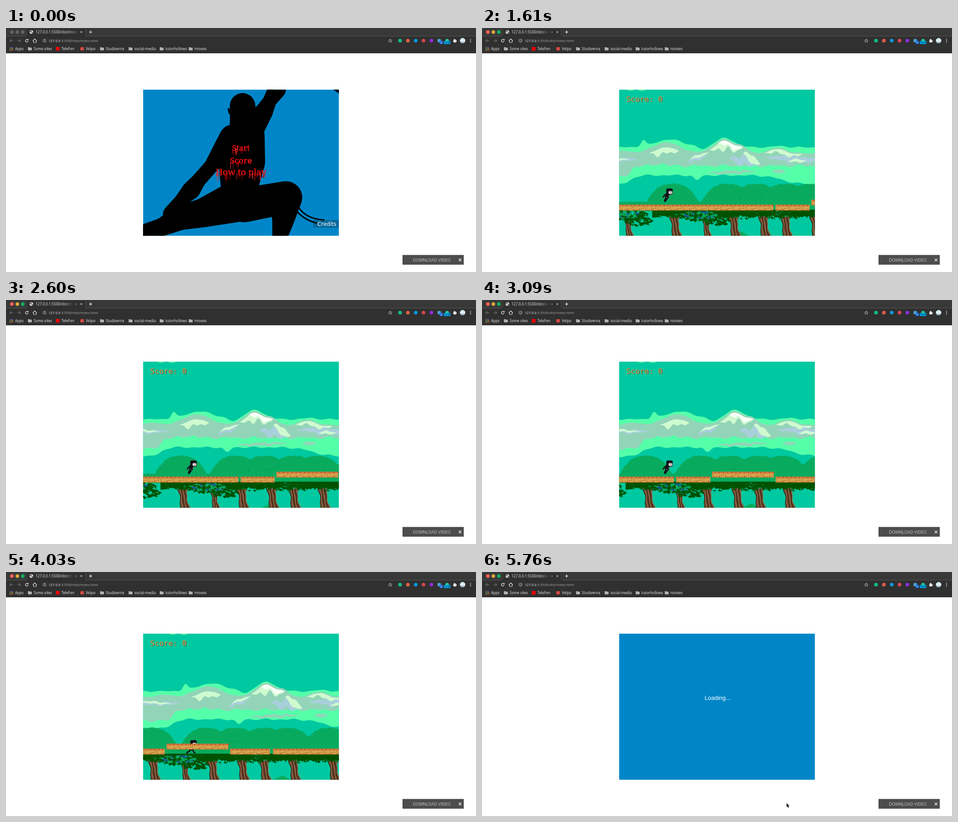
Recreate the animation shown at these times as an HTML page with a canvas. Size 1036x540 px, loop 5.86 s.

```html
<!DOCTYPE html>
<html lang="en">
<head>
<meta charset="utf-8">
<title>Ninja runner</title>
<style>
html, body { margin: 0; width: 100%; height: 100%; overflow: hidden; background: #fff; }
canvas { display: block; width: 1036px; height: 540px; }
</style>
</head>
<body>
<canvas id="stage"></canvas>
<script>
const W = 1036, H = 540, LOOP = 5860;
const canvas = document.getElementById('stage');
const ratio = window.devicePixelRatio || 1;
canvas.width = W * ratio;
canvas.height = H * ratio;
const g = canvas.getContext('2d');
g.scale(ratio, ratio);

const SANS = '"Noto Sans", sans-serif';
const BLUE = '#0086c8', SKY = '#00c8a0', BUSH = '#08ab5e', LEAF = '#005200';
const GREY = '#93d4b8', PALE = '#cffad0', MIST = '#a9cfdc', MINT = '#55ffaa', SNOW = '#f6fff6';

// ---------- helpers ----------
function seeded(seed) {
  return () => {
    seed = (seed * 16807) % 2147483647;
    return seed / 2147483647;
  };
}
function rect(x, y, w, h, fill) {
  g.fillStyle = fill;
  g.fillRect(x, y, w, h);
}
function round(x, y, w, h, r, fill) {
  g.fillStyle = fill;
  g.beginPath();
  g.roundRect(x, y, w, h, r);
  g.fill();
}
function ellipse(x, y, rx, ry, fill) {
  g.fillStyle = fill;
  g.beginPath();
  g.ellipse(x, y, rx, ry, 0, 0, 7);
  g.fill();
}
function dot(x, y, r, fill) {
  ellipse(x, y, r, r, fill);
}
function trace(pts) {
  g.beginPath();
  for (let i = 0; i < pts.length; i += 2) g.lineTo(pts[i], pts[i + 1]);
}
function line(pts, stroke, width = 1) {
  g.strokeStyle = stroke;
  g.lineWidth = width;
  trace(pts);
  g.stroke();
}
function poly(pts, fill) {
  g.fillStyle = fill;
  trace(pts);
  g.fill();
}
function ring(x, y, r, from, to, stroke, width) {
  g.strokeStyle = stroke;
  g.lineWidth = width;
  g.beginPath();
  g.arc(x, y, r, from, to);
  g.stroke();
}
// chain of circles joined by their outer tangents
function limb(fill, ...joints) {
  joints.forEach(([x, y, r], i) => {
    dot(x, y, r, fill);
    if (!i) return;
    const [px, py, pr] = joints[i - 1];
    const a = Math.atan2(y - py, x - px), b = Math.acos((pr - r) / Math.hypot(x - px, y - py));
    const at = (cx, cy, cr, dir) => [cx + cr * Math.cos(dir), cy + cr * Math.sin(dir)];
    poly([...at(px, py, pr, a + b), ...at(x, y, r, a + b), ...at(x, y, r, a - b), ...at(px, py, pr, a - b)], fill);
  });
}
// area between two functions of x
function outline(x0, x1, top, base, step = 2) {
  const upper = [], lower = [];
  for (let x = x0; x <= x1; x += step) {
    upper.push(x, top(x));
    lower.unshift(x, base(x));
  }
  return [...upper, ...lower];
}
function text(s, x, y, font, fill, align = 'left') {
  g.font = font;
  g.fillStyle = fill;
  g.textAlign = align;
  g.fillText(s, x, y);
}

// ---------- browser window ----------
function folder(x) {
  round(x, 42.5, 4, 3, 1, '#b4b4b4');
  round(x, 43.5, 8.5, 6, 1, '#b4b4b4');
}
function cross(x, y, r, tone, width) {
  line([x - r, y - r, x + r, y + r], tone, width);
  line([x + r, y - r, x - r, y + r], tone, width);
}
function drawTab(focused, audible) {
  const lights = focused ? ['#ff5f57', '#d8a93c', '#10b060'] : Array(3).fill('#626262');
  lights.forEach((c, i) => dot(13 + 12 * i, 9, 4, c));
  g.fillStyle = '#303030';
  g.strokeStyle = '#606060';
  g.lineWidth = .8;
  g.beginPath();
  g.moveTo(0, 18);
  g.arcTo(46, 18, 46, 1, 4);
  g.arcTo(46, 1, 174, 1, 4);
  g.arcTo(174, 1, 174, 18, 4);
  g.arcTo(174, 18, W, 18, 4);
  g.lineTo(W, 18);
  g.stroke();
  g.fill();
  dot(56, 9, 4, '#dedede');
  limb('#404040', [54.2, 8, 1.2], [56, 7, .8]);
  limb('#404040', [57.5, 11, 1.2], [58.5, 10, .8]);
  const end = audible ? 149 : 160;
  const fade = g.createLinearGradient(end - 20, 0, end, 0);
  fade.addColorStop(0, '#dddddd');
  fade.addColorStop(1, 'rgba(221,221,221,0)');
  text('127.0.0.1:5500/dist/index.html', 65, 12, '8px ' + SANS, fade);
  if (audible) poly([152, 9, 155.5, 6.5, 155.5, 11.5], '#777');
  cross(166, 9, 2, '#ddd', 1);
  const plus = focused ? '#f0f0f0' : '#d8d8d8';
  rect(183, 8.4, 7, 1.3, plus);
  rect(185.9, 5.5, 1.3, 7, plus);
}
function drawArrow(x, dir) {
  line([x - 3.7 * dir, 28, x + 3.7 * dir, 28], '#858585');
  line([x, 24.5, x + 3.7 * dir, 28, x, 31.5], '#858585');
}
function drawStar(x, y) {
  const pts = [];
  for (let i = 0; i <= 10; i++) {
    const r = i % 2 ? 1.8 : 4, a = i * Math.PI / 5 - Math.PI / 2;
    pts.push(x + r * Math.cos(a), y + r * Math.sin(a));
  }
  line(pts, '#c8c8c8', .9);
}
function drawToolbar() {
  const lit = '#e4e4e4', soft = '#c4c4c4';
  drawArrow(12, -1);
  drawArrow(29, 1);
  ring(46, 28, 3, .5, 5.4, lit, 1.2);
  poly([49.7, 24, 49.7, 27.6, 46.2, 27.6], lit);
  line([59, 28.5, 63.5, 24.2, 68, 28.5], lit, 1.2);
  line([60.5, 28, 60.5, 32, 66.5, 32, 66.5, 28], lit);
  ring(85, 28, 3.4, 0, 7, soft, .9);
  rect(84.5, 27.5, 1, 2.5, soft);
  rect(84.5, 25.7, 1, 1, soft);
  const font = '7.65px ' + SANS;
  text('127.0.0.1', 94, 30.8, font, '#e4e4e4');
  const host = g.measureText('127.0.0.1').width;
  text(':5500/dist/index.html', 94 + host, 30.8, font, '#a0a0a0');

  drawStar(847, 28.3);
  ['#12bf86', '#e0604a', '#0a9be0', '#d6454f', '#8c2be0', '#4aa3d8', '#2ac58e']
    .forEach((c, i) => dot(868.5 + 17.3 * i, 28, 4, c));
  round(956, 28.5, 7, 7, 1, '#1a66e0');
  text('2', 959.5, 34.2, '6px ' + SANS, '#fff', 'center');
  round(965, 28.8, 14.5, 6.6, 1, '#00a9ec');
  text('10:49', 972.2, 34, '5.2px ' + SANS, '#123', 'center');
  round(986, 26, 6, 6, .8, lit);
  dot(989, 25.6, 1.5, lit);
  dot(992.4, 29, 1.5, lit);
  const photo = g.createLinearGradient(0, 22, 0, 34);
  photo.addColorStop(0, '#bcdce8');
  photo.addColorStop(.5, '#f2f6f6');
  photo.addColorStop(1, '#6fa6b4');
  dot(1006.5, 28, 6, photo);
  for (let i = -1; i <= 1; i++) dot(1024, 28 + 3.2 * i, 1, lit);
}
function drawBookmarks() {
  const tones = ['#e2574c', '#d8a93c', '#4caf50', '#4a8af4'];
  for (let i = 0; i < 9; i++) {
    rect(8 + i % 3 * 2.8, 42.5 + Math.floor(i / 3) * 2.8, 1.9, 1.9, tones[(i * 3 + (i >> 1)) % 4]);
  }
  round(110, 42, 8, 8, 1, '#f00000');
  round(164, 42.5, 7.5, 7, 1, '#e04a3f');
  const folders = { 'Some sites': 61, Studiverna: 220, 'social-media': 283, tutorhollows: 351.5, movies: 415.5 };
  const links = { Apps: 20, TeleFen: 122, Velpo: 176 };
  for (const x of Object.values(folders)) folder(x - 12.6);
  for (const [s, x] of Object.entries({ ...folders, ...links })) text(s, x, 48.5, '8px ' + SANS, '#e0e0e0');
}
function drawBrowser(t) {
  rect(0, 0, W, H, '#fff');
  rect(0, 0, W, 56, '#303030');
  rect(0, 0, W, 18, '#383838');
  drawTab(t >= 720, t >= 880);
  drawToolbar();
  drawBookmarks();
  rect(874, 502.3, 135, 21.5, '#4d4d4d');
  text('DOWNLOAD VIDEO', 897, 516.6, '300 9.9px Roboto, sans-serif', '#f4f4f4');
  cross(1000.8, 513.2, 2.8, '#fff', 1.3);
}

// ---------- menu ----------
function drawFighter() {
  const ink = '#000';
  limb(ink, [521.5, 172, 28], [521.5, 212, 28]);
  limb(ink, [490.5, 179, 2], [493, 188, 2.5]);
  limb(ink, [597, 136, 20], [581, 162, 15], [568, 186, 20], [545, 215, 28]);
  limb(ink, [530, 238, 40], [520, 295, 51], [515, 345, 42]);
  limb(ink, [502, 246, 33], [453, 305, 16], [424, 338, 16], [408, 359, 20], [385, 382, 14], [366, 412, 20]);
  limb(ink, [505, 385, 45], [435, 409, 32], [385, 420, 27], [345, 440, 20], [300, 453, 17]);
  limb(ink, [525, 392, 38], [617, 375, 36], [611, 425, 24], [602, 470, 15]);
}
function rope(x, y, cx, cy, ex, ey) {
  g.strokeStyle = '#000';
  g.lineWidth = 3.2;
  g.beginPath();
  g.moveTo(x, y);
  g.quadraticCurveTo(cx, cy, ex, ey);
  g.stroke();
}
function bloody(s, y, size, seed) {
  const rnd = seeded(seed);
  const tone = g.createLinearGradient(0, y - 13, 0, y + 2);
  tone.addColorStop(0, '#d80000');
  tone.addColorStop(.55, '#ff1a1a');
  tone.addColorStop(1, '#a80000');
  text(s, 518, y, size + 'px "Noto Serif", serif', tone, 'center');
  g.strokeStyle = tone;
  g.lineWidth = .5;
  g.strokeText(s, 518, y);
  const w = g.measureText(s).width;
  for (let i = 0; i < w / 4; i++) {
    const x = 519 - w / 2 + rnd() * (w - 2);
    line([x, y - 5, x, y + rnd() * 14], i % 3 ? '#c80000' : '#ff3030', .5 + rnd() * .7);
  }
}
function drawMenu() {
  rect(302, 136, 432, 324, BLUE);
  drawFighter();
  poly([721, 136, 734, 136, 734, 145], '#000');
  rope(641, 389, 655, 422, 702, 425);
  rope(638, 402, 656, 425, 686, 432);
  rect(677, 425, 57, 17, 'rgba(20,50,70,.36)');
  text('Credits', 686.6, 438, '11.8px "DejaVu Sans", sans-serif', '#fff');
  bloody('Start', 272, 17.2, 11);
  bloody('Score', 300, 18.3, 29);
  bloody('How to play', 326, 19.5, 47);
}

// ---------- clouds ----------
const hill = (x, c, h, w) => h * Math.exp(-(((x - c) / w) ** 2));
const ripple = (x, size) => size * (Math.sin(x / 5.3) + Math.sin(x / 8.9 + 2)) / 2;

const mintTop = x => 264 - hill(x, 349, 13, 7) - hill(x, 407, 17, 45) + hill(x, 482, 7, 14)
  - hill(x, 528, 20, 30) - hill(x, 650, 3, 18) + ripple(x, 1.5);
const mintBase = x => 346 - 10 * (Math.tanh((x - 322) / 14) - Math.tanh((x - 655) / 35))
  + hill(x, 467, 11, 9) + ripple(x, 2);
const greyTop = x => 277 - hill(x, 302, 5, 25) - hill(x, 400, 24, 42) - hill(x, 528, 31, 34)
  - hill(x, 568, 10, 14) - hill(x, 645, 12, 26) + ripple(x, 1);
const greyBase = x => 305 + 12 * (1 - Math.tanh((x - 322) / 7)) + ripple(x, 3);

// light cap that follows the ridge of a hill
function crest(tone, x0, x1, depth, thick) {
  const top = x => greyTop(x) + depth;
  const swell = x => 1 - ((2 * x - x0 - x1) / (x1 - x0)) ** 2;
  poly(outline(x0, x1, top, x => top(x) + swell(x) * (thick + ripple(x * 1.6, thick * .5))), tone);
}
// wavy lens, rising or falling by tilt over its half width
function streak(tone, x, y, w, h, tilt = 0) {
  const u = v => (v - x) / (w / 2);
  const edge = sign => v => y + tilt * u(v) + sign * (1 - u(v) ** 2) * (h / 2 + sign * ripple(v * 1.5, h * .35));
  poly(outline(x - w / 2, x + w / 2, edge(-1), edge(1)), tone);
}
function drawClouds() {
  poly(outline(220, 780, mintTop, mintBase), MINT);
  poly(outline(220, 780, greyTop, greyBase), GREY);
  streak(MIST, 290, 291, 100, 8);
  streak(PALE, 280, 289, 80, 5, 3);
  crest(PALE, 362, 428, 11, 14);
  crest(PALE, 494, 569, 5, 17);
  crest(SNOW, 514, 568, 4, 11);
  streak(MINT, 392, 306, 54, 8);
  streak(MIST, 468, 288, 44, 13, -8);
  streak(PALE, 472, 283, 44, 6, -8);
  streak(MIST, 572, 294, 70, 20, 6);
  streak(PALE, 588, 289, 38, 18, 12);
  streak(MIST, 682, 290, 130, 13, 4);
  crest(PALE, 616, 700, 3, 9);
  streak(PALE, 688, 294, 40, 7);
  streak(GREY, 545, 319, 115, 7, -2);
  streak(GREY, 648, 318, 32, 8);
  ellipse(321, 136.3, 8, 2.2, '#7dffa8');
  ellipse(346, 136.3, 9, 2.4, '#7dffa8');
  poly([540, 461, 564, 450, 584, 461], BUSH);
}

// ---------- forest ----------
const rnd = seeded(77);
const trunks = [440, 570, 636, 684, 749, 836];
const bushTrees = [338, 510];

const domes = [437, 558, 622, 685, 738, 828];
const domeTop = x => Math.min(...domes.map(c => 384 - 39 * Math.max(0, 1 - Math.abs((x - c) / 57) ** 2.7)));
const bushes = outline(200, 900, x => domeTop(x) + (rnd() - .5) * 2.4, () => 406);
const canopy = outline(392, 900, () => 402, x => 418 + ripple(x, 2) + (rnd() - .5) * 5);

function scatter(n, x, y, rx, ry, tones) {
  return Array.from({ length: n }, () => {
    const a = rnd() * 2 * Math.PI, d = Math.sqrt(rnd());
    return { x: x + rx * d * Math.cos(a), y: y + ry * d * Math.sin(a), r: 1.5 + rnd() * 3.5, tone: tones[Math.floor(rnd() * tones.length)] };
  });
}
const bandLeaves = scatter(220, 650, 413, 255, 9, [LEAF, LEAF, LEAF, '#087a3a']);
const treeLeaves = bushTrees.flatMap(x => [
  ...scatter(150, x - 8, 415, 56, 12, [LEAF]),
  ...scatter(70, x + 24, 427, 30, 10, [LEAF]),
  ...scatter(90, x - 16, 414, 40, 8, [BUSH, BUSH, '#0a9a62']),
  ...scatter(36, x - 16, 414, 42, 10, [LEAF, LEAF, '#16559a'])
]);

function drawLeaf({ x, y, r, tone }) {
  poly([x - r, y, x - r * .2, y - r * .6, x + r, y + r * .2, x, y + r * .7], tone);
}
function drawTrunk(x, top, size) {
  const f = y => (y - top) / (460 - top);
  const across = k => y => x + 6 * f(y) * size + k * size * (7.5 + 10 * (f(y) - .45) ** 2) + Math.sin(y / 4) * .6;
  const side = (k, sway = 0) => {
    const pts = [];
    for (let y = top; y <= 462; y += 3) pts.push(across(k)(y) + sway * Math.sin(y / 5 + k * 4), y);
    return pts;
  };
  const right = side(1);
  line([x + 5 * size, top + 11, x + 12 * size, top + 2], '#6b452c', 3 * size);
  g.fillStyle = '#6b452c';
  trace(side(-1));
  for (let i = right.length - 2; i >= 0; i -= 2) g.lineTo(right[i], right[i + 1]);
  g.fill();
  for (let i = 0; i < 6; i++) line(side(-1 + i * .4, .7), i % 2 ? '#a07a56' : '#2b1409', 1.1);
}
function drawForest() {
  poly(bushes, BUSH);
  for (const x of [586, 625, 632, 752]) rect(x, 372 + x % 7, 1, 2, LEAF);
  trunks.forEach(x => drawTrunk(x, 417, 1));
  bushTrees.forEach(x => drawTrunk(x, 428, .72));
  poly(canopy, LEAF);
  bandLeaves.forEach(drawLeaf);
  treeLeaves.forEach(drawLeaf);
}

// ---------- platforms ----------
const platforms = [[200, 704.5, 391], [709.5, 784.5, 391], [788.5, 924.5, 380], [928.5, 1016.5, 391],
  [1023, 1171, 391], [1171.5, 1420, 370]];
function drawPlatform([x0, x1, y]) {
  rect(x0, y, x1 - x0, 13, '#d9a24e');
  for (let x = x0, i = 0; x < x1 - 2; x += 4.6, i++) {
    poly([x, y + 4, x, y + 1, x + 2, y - .8, x + 4.6, y + 1, x + 3, y + 4], i % 2 ? '#b9602e' : '#cc7440');
    rect(x + 1, y + 6 + i * 5 % 6, 1.8, 1.6, '#9a5a24');
    if (i % 3 === 0) rect(x + 2, y + 10, 2.2, 1.5, '#7d4719');
  }
  rect(x0, y + 12.2, x1 - x0, .8, '#a8702e');
}

// ---------- player ----------
function drawPlayer(fall, gathered) {
  const ink = '#14141a';
  g.save();
  g.translate(0, fall);
  if (gathered) {
    limb(ink, [407, 376, 3.2], [403.5, 382.5, 2.6]);
  } else {
    limb(ink, [406, 375, 2], [404, 380, 1.5], [398.5, 382.5, 1.4], [400, 384.6, .8]);
    limb(ink, [409, 375, 2], [413, 379, 1.5], [414.5, 383, 1.3], [417.5, 382.6, 1]);
  }
  limb(ink, [409, 368, 4.5], [407.5, 374, 4.3]);
  limb(ink, [405, 368, 1.6], [400.5, 372, 1.2]);
  dot(399.5, 374.3, 1.7, '#2b2b30');
  rect(405, 375, 5, .8, '#8a8a90');
  dot(412.5, 372, 1, '#c8c8c8');
  round(406, 355, 14.5, 14, 4, ink);
  round(411.5, 361, 8, 6.5, 2, '#e9eceb');
  rect(412.5, 365, 6.5, 1.5, '#c7a08e');
  rect(416, 362, 1.2, 2, ink);
  g.restore();
}

// ---------- timeline ----------
const bursts = [[880, 1420, 7], [1510, 2020, 6], [2130, 2700, 7], [2800, 3380, 7], [3490, 4030, 6], [4120, 4630, 6]];
const ticks = bursts.flatMap(([a, b, n]) =>
  Array.from({ length: n }, (_, i) => Math.round((a + (b - a) * i / (n - 1)) / 10) * 10));

// the run speeds up evenly until the fall ends it
function scrollAt(t) {
  const s = (Math.min(t, 4380) - 1150) / 1000;
  return -133 * s - 6.2 * s * s;
}
function fallAt(t) {
  const s = Math.max(0, Math.min(t, 4385) - 3770) / 1000;
  return 251 * s * s;
}
function layer(dx, draw) {
  g.save();
  g.translate(dx, 0);
  draw();
  g.restore();
}
function drawGame(time) {
  const n = ticks.filter(s => s <= time).length - 1;
  const scroll = scrollAt(ticks[n]), fall = fallAt(ticks[n]);
  rect(302, 136, 432, 324, SKY);
  layer(-.106 * scroll, drawClouds);
  layer(.268 * scroll, drawForest);
  drawPlayer(fall, n % 3 === 2 && !fall);
  layer(scroll, () => platforms.forEach(drawPlatform));
  const font = '16.7px "DejaVu Sans Mono", monospace';
  text('Score: 0', 318.8, 164.2, font, '#4a5a48');
  text('Score: 0', 317.4, 162.8, font, '#dda04a');
}
function drawLoading() {
  rect(302, 136, 432, 324, BLUE);
  text('Loading...', 519.3, 283, '13px "Liberation Sans", Arial, sans-serif', '#fff', 'center');
}
function drawTooltip(t) {
  round(688, 520, 80, 16, 3, '#252525');
  text('Velnor Screen Grabber', 728, 530.8, '6.8px ' + SANS, t < 4730 ? '#8a8a8a' : '#dcdcdc', 'center');
}
function drawCursor(x, y) {
  const pts = [x, y, x, y + 8.5, x + 2, y + 6.8, x + 3.4, y + 10, x + 4.8, y + 9.3, x + 3.4, y + 6.3, x + 6, y + 6.2, x, y];
  line(pts, '#ddd', 1.4);
  poly(pts, '#000');
}
function draw(t) {
  drawBrowser(t);
  g.save();
  g.beginPath();
  g.rect(302.3, 136.4, 431.4, 323.3);
  g.clip();
  if (t < 880) drawMenu();
  else if (t < 5450) drawGame(t);
  else drawLoading();
  g.restore();
  if (t >= 4630 && t < 5670) drawTooltip(t);
  if (t >= 5670) drawCursor(671.5, 511.8);
}

const start = performance.now();
function tick() {
  draw((performance.now() - start) % LOOP);
  requestAnimationFrame(tick);
}
tick();
</script>
</body>
</html>
```
